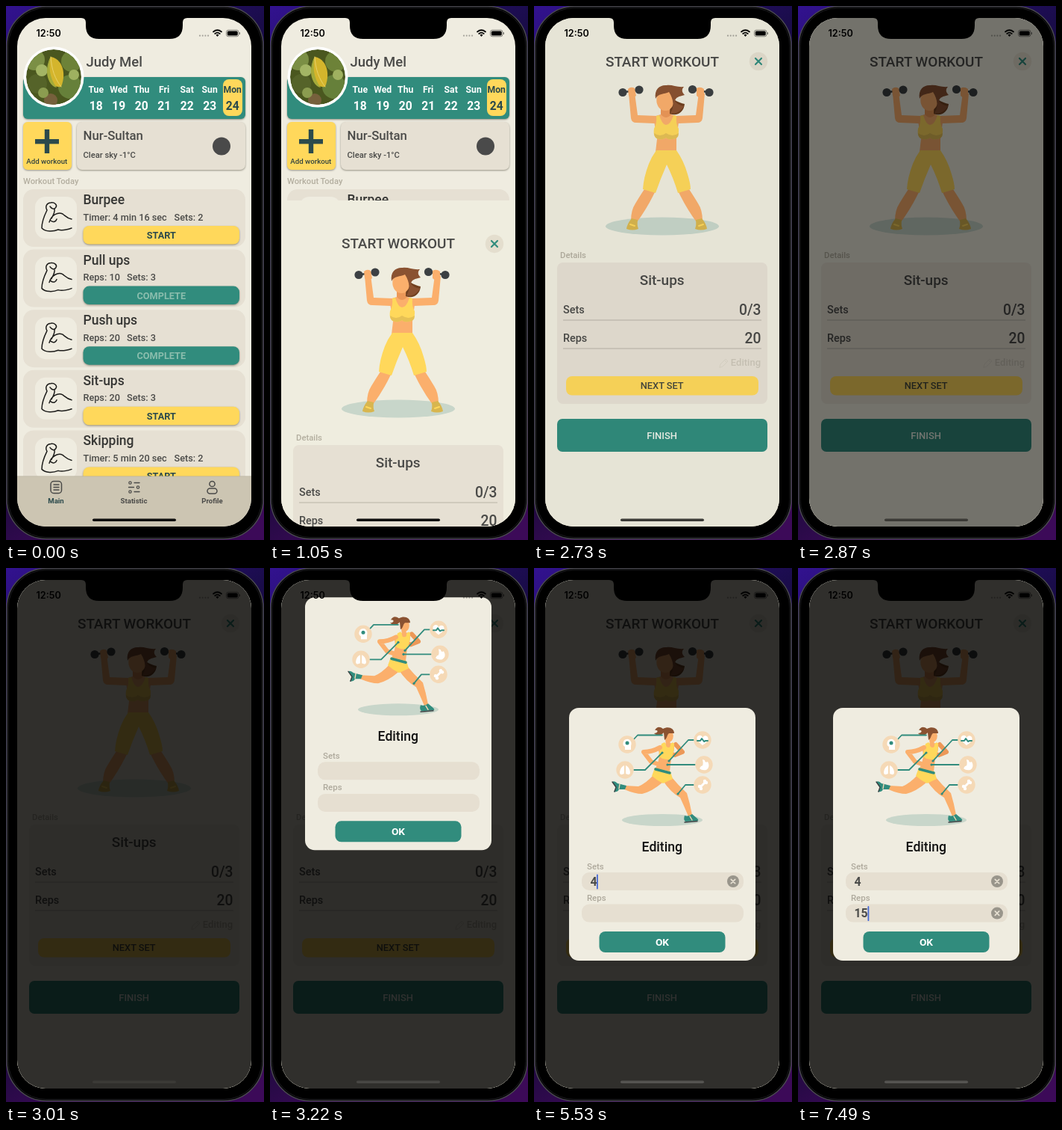
Recreate the animation shown at these times as an HTML page. Size 346 by 714 pixels, loop 8000 ms.

```html
<!DOCTYPE html>
<html lang="en">
<head>
<meta charset="utf-8">
<title>Workout app</title>
<style>
  html, body { margin: 0; width: 100%; height: 100%; overflow: hidden; background: #160a3c; }
  svg { display: block; width: 346px; height: 714px; }
  text { font-family: Roboto, sans-serif; white-space: pre; }
  .sys { font-family: Inter, sans-serif; }
  .lift { filter: drop-shadow(0 1.5px 1px rgba(60, 55, 40, .5)); }
</style>
</head>
<body>
<svg id="stage" viewBox="0 0 346 714"></svg>
<script>
const C = {
  bg: '#efece0', card: '#e6e0d3', green: '#318c7d', yellow: '#ffd85b', ink: '#4a4a48',
  dark: '#363634', mute: '#b3ae9f', navy: '#2b4a4c', skin: '#fbaf6c', skinDark: '#ec9858',
  hair: '#8a5231', iron: '#3c4043', peach: '#f5d9b6', ground: '#c8d6ca'
};

const rect = (x, y, w, h, r, fill, more = '') =>
  `<rect x="${x}" y="${y}" width="${w}" height="${h}" rx="${r}" fill="${fill}" ${more}/>`;
const dot = (x, y, r, fill, more = '') =>
  `<circle cx="${x}" cy="${y}" r="${r}" fill="${fill}" ${more}/>`;
const oval = (x, y, rx, ry, fill) =>
  `<ellipse cx="${x}" cy="${y}" rx="${rx}" ry="${ry}" fill="${fill}"/>`;
const shape = (d, fill) => `<path d="${d}" fill="${fill}"/>`;
const line = (d, color, w, more = '') =>
  `<path d="${d}" fill="none" stroke="${color}" stroke-width="${w}" stroke-linecap="round" stroke-linejoin="round" ${more}/>`;
const text = (x, y, s, size, weight = 500, fill = C.ink, anchor = 'start', more = '') =>
  `<text x="${x}" y="${y}" font-size="${size}" font-weight="${weight}" fill="${fill}" text-anchor="${anchor}" ${more}>${s}</text>`;
const mid = (x, y, s, size, weight, fill) => text(x, y, s, size, weight, fill, 'middle');
const group = (inner, more = '') => `<g ${more}>${inner}</g>`;
const cross = (x, y, a, color, w) =>
  line(`M${x - a} ${y - a}l${2 * a} ${2 * a}m0 ${-2 * a}l${-2 * a} ${2 * a}`, color, w);

function avatar() {
  const blobs = [[38, 72, 14, '#7b8f45'], [88, 74, 14, '#6d8238'], [42, 104, 13, '#556329'],
    [86, 108, 16, '#66803a'], [60, 126, 9, '#76603c'], [48, 86, 8, '#a3b565'], [91, 92, 7, '#9fb160'], [50, 116, 7, '#8b9c50']];
  return dot(64, 95, 40.5, '#fff') +
    group(dot(64, 95, 37, '#4a571f') + blobs.map(b => dot(...b)).join('') +
      shape('M60 68C74 70 82 88 74 108C64 110 56 100 56 88C56 80 57 73 60 68Z', '#d4b52c') +
      shape('M60 68C57 80 58 96 68 109C60 108 55 97 55 88C55 80 57 73 60 68Z', '#a4ab3a') +
      line('M60 68C61 85 66 98 74 108', '#e8d26a', 1), 'clip-path="url(#face)"');
}

function days() {
  return ['Tue', 'Wed', 'Thu', 'Fri', 'Sat', 'Sun', 'Mon'].map((d, i) => {
    const x = 120.7 + i * 30.5, color = i === 6 ? C.navy : '#fff';
    return (i === 6 ? rect(291, 98, 26, 49, 8, C.yellow) : '') +
      mid(x, 116, d, 12.2, 700, color) + mid(x, 139, 18 + i, 15.6, 700, color);
  }).join('');
}

const arm = line('M55 273C51 281 48 290 48 297C53 302 63 302 70 299C76 301 82 299 88 297' +
  'M55 273C52 268 55 263 60 263C65 262 69 266 67 269C65 273 61 271 59 268' +
  'M65 271C66 276 63 280 61 284M58 289C61 279 70 275 76 278C80 281 82 284 88 285M60 287C64 290 67 288 68 285', '#1d1d1b', 1.5);

function workout([name, first, sets, setsX, done], i) {
  const button = rect(103.5, 294, 209.5, 24.5, 8, done ? C.green : C.yellow, 'class="lift"') +
    mid(208.3, 311, done ? 'COMPLETE' : 'START', 12.7, 700, done ? '#8abdad' : C.navy);
  return group(rect(23, 245, 298, 77, 14, C.card) + rect(39, 255, 56, 56, 14, C.bg) + arm +
    text(103.5, 265, name, 17.5, 500, C.dark) + text(103.5, 286.5, first, 12.7) + text(setsX, 286.5, 'Sets: ' + sets, 12.7) +
    group(button, `id="go${i}"`), `transform="translate(0 ${i * 80.6})"`);
}

function tabs() {
  const st = C.ink;
  return rect(15, 629, 314, 68, 0, '#ccc5b2') + rect(15, 628.5, 314, .7, 0, '#b8b19e') +
    `<rect x="60" y="635.5" width="14.5" height="16" rx="4" fill="none" stroke="${st}" stroke-width="1.5"/>` +
    line('M64 640h7M64 643.5h7M64 647h7', st, 1.3) +
    line('M172 637.5h7M164.500 643.5h7M172 649.5h7', st, 1.3) +
    [[166.5, 637.5], [177, 643.5], [166.5, 649.5]].map(p => dot(...p, 1.7, 'none', `stroke="${st}" stroke-width="1.2"`)).join('') +
    dot(276.5, 639, 3.6, 'none', `stroke="${st}" stroke-width="1.5"`) +
    `<rect x="270" y="645" width="13" height="7" rx="3.5" fill="none" stroke="${st}" stroke-width="1.5"/>` +
    mid(67, 665, 'Main', 9.6, 700, C.navy) + mid(171.5, 665, 'Statistic', 9.6, 700, C.ink) +
    mid(276.5, 665, 'Profile', 9.6, 700, C.ink);
}

function home() {
  const list = [['Burpee', 'Timer: 4 min 16 sec', 2, 225.5], ['Pull ups', 'Reps: 10', 3, 162, 1],
    ['Push ups', 'Reps: 20', 3, 162, 1], ['Sit-ups', 'Reps: 20', 3, 162], ['Skipping', 'Timer: 5 min 20 sec', 2, 225.5]];
  return rect(15, 16, 314, 680, 0, C.bg) + text(107.5, 81, 'Judy Mel', 18.5) +
    rect(23, 95, 298, 56, 6, C.green, 'class="lift"') + days() + avatar() +
    rect(23, 155, 65, 64, 6, C.yellow, 'class="lift"') + rect(39, 178, 32, 6.4, 0, C.navy) + rect(51.8, 165, 6.4, 32, 0, C.navy) +
    mid(54.8, 211, 'Add workout', 9.7, 500, '#33443f') +
    rect(95, 155, 226, 64, 7, C.card, 'class="lift"') + text(103.5, 179, 'Nur-Sultan', 16.8) +
    text(103.5, 203, 'Clear sky -1°C', 11.2) + dot(289, 187.5, 12, '#4a4a4a') +
    text(23, 238, 'Workout Today', 11.2, 500, C.mute) + list.map(workout).join('') + tabs();
}

function athlete() {
  const weight = (x1, y1, x2, y2) => line(`M${x1} ${y1}L${x2} ${y2}`, C.iron, 2.5) +
    dot(x1, y1, 5.6, C.iron) + dot(x2, y2, 5.6, C.iron);
  return oval(172, 294.5, 76, 12, C.ground) +
    weight(119, 115.5, 141, 112) + weight(212.5, 111.5, 235, 115.5) +
    shape('M127 117L135 116L139 146L165 147L162 157L137 156Q131 156 130 150Z', C.skin) +
    shape('M229 117L221 116L217 146L190 147L193 157L219 156Q225 156 226 150Z', C.skin) +
    shape('M126 111Q130 107 135 110L137 120Q131 125 127 120ZM218 110Q223 107 228 111L228 120Q223 125 218 120Z', C.skin) +
    shape('M170 132H184V145L195 148L191 178L191 195H163L165 178L160 148L170 145Z', C.skin) +
    shape('M170 136Q178 142 184 138V145Q177 153 170 145Z', C.skinDark) +
    shape('M164 147L168 146Q172 159 177 159Q183 159 187 146L191 147Q190 158 194 164Q195 178 185 178Q180 179 177 176Q173 179 168 178Q159 177 161 164Q165 157 164 147Z', C.yellow) +
    shape('M161 170Q169 176 177 170Q186 176 194 170Q194 178 185 178Q180 179 177 176Q173 179 168 178Q161 177 161 170Z', '#e6c155') +
    shape('M148 245L162 249Q152 270 138 289L130 287Q130 273 136 264Q142 254 148 245Z', C.skin) +
    shape('M208 245L194 249Q204 270 218 289L226 287Q226 273 220 264Q214 254 208 245Z', C.skin) +
    shape('M164 193H191Q201 207 206 225Q210 238 210 245L193 250Q187 230 178 212Q170 230 163 250L146 245Q147 229 154 211Q158 201 164 193Z', C.yellow) +
    shape('M131 284L139 286Q138 293 140 298Q132 301 124 298Q125 291 131 284ZM225 284L217 286Q218 293 216 298Q224 301 232 298Q231 291 225 284Z', '#d8b64f') +
    line('M129 292l6 2M227 292l-6 2', C.yellow, 2) +
    shape('M183 122C189 126 193 129 202 131C201 142 192 148 182 144Z', '#70401f') +
    oval(176, 126, 11.7, 14, C.skin) +
    shape('M163 124C161 111 169 105 178 106C185 105 192 109 201 108C197 112 199 116 202 119C194 121 190 122 189 127C192 132 198 133 201 134C196 142 189 145 183 143C188 136 188 126 181 115C175 118 166 117 163 124Z', C.hair);
}

function sheet() {
  const rule = y => rect(39, y, 266, 1, 0, '#b9b4a7');
  return rect(15, 16, 314, 700, 0, '#efeddf') + mid(172, 80.5, 'START WORKOUT', 19, 500, C.ink) +
    dot(301, 74, 12.2, '#e4dece') + cross(301, 74, 4, C.green, 2.2) + athlete() +
    text(35, 337, 'Details', 11.3, 500, C.mute) + rect(31, 343, 282, 189, 8, C.card) +
    mid(171.7, 373, 'Sit-ups', 19, 500, C.ink) +
    text(39, 411, 'Sets', 14.4) + text(304.5, 413, '0/3', 19.3, 500, C.ink, 'end') + rule(419.5) +
    text(39, 449, 'Reps', 14.4) + text(304.5, 451, '20', 19.3, 500, C.ink, 'end') + rule(457.5) +
    group(text(304, 481, 'Editing', 13, 500, C.mute, 'end') +
      line('M249 483l1-4l7-7l3 3l-7 7zM255.500 473.500l3 3', '#d2ccbd', 1), 'id="edit"') +
    rect(43, 495, 258, 25.5, 8, C.yellow) + mid(171.7, 512, 'NEXT SET', 12.8, 500, '#45483d') +
    rect(31, 552, 282, 44, 7, C.green) + mid(171.7, 579, 'FINISH', 13, 500, '#eef3ea');
}

function runner() {
  const badges = [[125, 236], [122, 270], [226, 230], [228, 263], [226, 290]];
  return oval(172, 337, 54, 8, C.ground) +
    // far arm and far leg
    line('M190 236L199 246L189 250', C.skinDark, 6) + line('M189 250L183 247', C.skinDark, 4.5) +
    shape('M160 277L172 287Q158 299 145 302Q135 302 121 296L122 291L140 292Q150 288 160 277Z', C.skin) +
    shape('M105 286Q108 284 112 288L124 291L122 296L114 296Q112 300 107 299L110 294Z', C.green) +
    line('M105 286l5 7l-2 6', C.iron, 1.4) + line('M115 289l-1 6', C.peach, 1.4) +
    // near leg
    shape('M172 283L184 279Q193 290 205 301Q209 314 212 330L207 332Q202 320 196 307Q183 300 172 283Z', C.skin) +
    shape('M202 331Q207 333 212 329L219 335Q222 338 218 338L203 339Q200 336 202 331Z', C.green) +
    line('M202 340L219 338.500', C.iron, 1.4) + line('M209 332l3 5', C.peach, 1.4) +
    // torso
    shape('M172 235L188 234Q189 246 184 255L182 272L163 268Q170 254 167 244Z', C.skin) +
    shape('M171 235L175 233Q180 240 186 233L188 235Q188 249 183 256Q174 257 167 252Q169 242 171 235Z', C.yellow) +
    shape('M162 267L183 272L186 282L173 288Q165 284 158 278Z', C.yellow) + line('M163 269L182 274', C.green, 3.5) +
    line('M169 240Q158 246 147 246L157 259L166 262', C.skin, 6) +
    // head
    line('M179 228L180 237', C.skin, 6) + oval(181, 224.5, 5.8, 8, C.skin) +
    shape('M188 221C188 214 180 211 173 215C168 211 164 213 162 217C167 216 167 221 161 221C166 226 172 223 174 220L175 230C179 228 178 223 181 221Z', C.hair) +
    // call-outs
    line('M131 232L139 223.500H172M134 270H149L172 247M214 230H207L181 258M216 263H179M214 290H203L193 302', C.green, 1.8) +
    [[172, 247], [181, 258], [179, 263], [193, 302]].map(p => dot(...p, 1.6, C.green)).join('') +
    badges.map(b => dot(...b, 11.7, C.peach)).join('') +
    shape('M120 232Q122 228 127 229Q132 232 130 238V243H122V239Q118 237 120 232Z', '#fff') + dot(125, 234, 2.5, C.green) +
    shape('M121 264V275Q115 278 115 273Q116 266 121 264ZM123 264V275Q129 278 129 273Q128 266 123 264Z', '#fff') +
    shape('M226 237Q214 228 221 224Q225 223 226 227Q228 223 232 225Q237 230 226 237Z', '#fff') + line('M219 231h4l2-3l3 4l2-1h3', C.green, 2) +
    shape('M226 256L229 257Q229 261 233 259Q237 266 231 270Q225 271 222 268L224 265Q228 265 226 256Z', '#fff') +
    line('M223 293L230 286', '#fff', 3) + [[222, 292], [224, 295], [229, 285], [231, 287]].map(p => dot(...p, 2.2, '#fff')).join('');
}

function dialog() {
  const field = (id, label, y) => text(71, y - 4.5, label, 11.4, 500, '#aea99c') + rect(64, y, 217, 24, 10, '#e6dfd1') +
    text(75.5, y + 17.8, '', 15.8, 700, C.ink, 'start', `id="${id}"`) +
    group(dot(267, y + 12, 8, '#99958b') + cross(267, y + 12, 2.7, '#e6dfd1', 1.7), `id="${id}X"`);
  return rect(47, 187, 250, 338, 13, C.bg) + runner() + mid(171.8, 379, 'Editing', 17.6, 500, '#111') +
    field('sets', 'Sets', 407) + field('reps', 'Reps', 449.6) +
    rect(76, 409.5, 1.8, 20, .9, '#4468d6', 'id="caret"') +
    rect(87.5, 486, 169, 28, 8, C.green) + mid(172, 505, 'OK', 13.7, 700, '#fff');
}

function status() {
  return text(40.5, 41, '12:50', 12.6, 600, '#000', 'start', 'class="sys"') +
    [0, 1, 2, 3].map(i => dot(260 + i * 3.7, 39.7, 1.1, '#000', 'opacity=".3"')).join('') +
    line('M278 34.500Q283.500 30 289 34.500M280.200 37Q283.500 34.200 286.800 37', '#000', 1.7) +
    shape('M281.500 38.700Q283.500 37 285.500 38.700L283.500 41Z', '#000') +
    `<rect x="295.5" y="32.2" width="16.5" height="8.6" rx="2.7" fill="none" stroke="#000" stroke-opacity=".45"/>` +
    rect(296.8, 33.5, 13.9, 6, 1.5, '#000') + rect(312.8, 35, 1.2, 3, .6, '#000', 'opacity=".5"');
}

const stage = document.getElementById('stage');
stage.innerHTML = `<defs>
  <linearGradient id="desk" x2=".3" y2="1"><stop offset="0" stop-color="#32128f"/><stop offset=".3" stop-color="#1a0c4a"/>
    <stop offset=".8" stop-color="#170a38"/><stop offset="1" stop-color="#3c0a58"/></linearGradient>
  <clipPath id="screen">${rect(15, 16, 314, 680, 38, '#000')}</clipPath>
  <clipPath id="face">${dot(64, 95, 37, '#000')}</clipPath></defs>` +
  rect(0, 0, 346, 714, 0, 'url(#desk)') +
  rect(1, .5, 344, 712, 53, '#000', 'stroke="#4a4950" stroke-width="1.5"') +
  rect(3, 2.5, 340, 708, 51, '#000', 'stroke="#1c1c1f" stroke-width="1"') +
  group(group(home()) + group(sheet(), 'id="sheet"') + rect(15, 16, 314, 680, 0, '#000', 'id="dim"') +
    group(dialog(), 'id="dialog"') + status() + rect(116, 685.5, 112, 3.6, 1.8, '#000', 'id="bar"'), 'clip-path="url(#screen)"') +
  shape('M101 15V16Q107 16 107 22V26Q107 44 125 44H219Q237 44 237 26V22Q237 16 243 16V15Z', '#000');

const el = id => document.getElementById(id);
const LOOP = 8000, STEP = 70;

// time, sets, reps, caret row, caret x, caret opacity
const typing = [
  [0, '', '', 0, 76, 0], [4410, '', '', 0, 76, 1], [5040, '', '', 0, 76, .5], [5110, '', '', 0, 76, 0],
  [5390, '', '', 0, 76, .4], [5460, '', '', 0, 76, 1], [5530, '4', '', 0, 84, 1], [6090, '4', '', 0, 84, .5],
  [6160, '4', '', 0, 84, 0], [6230, '4', '', 1, 76, 1], [6790, '4', '', 1, 76, .7], [6860, '4', '', 1, 76, .3],
  [6930, '4', '', 1, 76, 0], [7210, '4', '', 1, 76, .4], [7280, '4', '', 1, 76, 1], [7350, '4', '1', 1, 84.5, 1],
  [7490, '4', '15', 1, 93.5, 1]
];
const barColors = [[0, '#0b0b0b'], [1330, '#6a6963'], [2730, '#3b3a36'], [3080, '#484744'], [4410, '#555451']];

const at = (table, t) => table.findLast(row => t >= row[0]);
const part = (t, a, b) => Math.min(1, Math.max(0, (t - a) / (b - a)));
const smooth = u => u * u * (3 - 2 * u);
const spring = s => s <= 0 ? 1 : (1 + 18.26 * s) * Math.exp(-18.26 * s);
const show = (node, on) => node.setAttribute('visibility', on ? 'visible' : 'hidden');
const move = (node, x, y) => node.setAttribute('transform', `translate(${x} ${y})`);

function draw(t) {
  const slide = 684 * spring((t - 930) / 1000);
  move(el('sheet'), 0, slide < 1 ? 0 : slide);
  show(el('sheet'), t >= 980);
  el('go3').setAttribute('opacity', t >= 840 && t < 1470 ? .6 : 1);
  el('edit').setAttribute('opacity', t >= 2590 && t < 3010 ? .5 : 1);
  el('dim').setAttribute('opacity', t < 2730 ? 0 : .8 * smooth(part(t, 2690, 2990)));
  show(el('dialog'), t >= 2870);
  move(el('dialog'), 0, -714 * (1 - smooth(part(t, 2930, 3340))));
  el('bar').setAttribute('fill', at(barColors, t)[1]);

  const [, sets, reps, row, x, alpha] = at(typing, t);
  for (const [id, value] of [['sets', sets], ['reps', reps]]) {
    el(id).textContent = value;
    el(id + 'X').setAttribute('opacity', value ? 1 : 0);
  }
  move(el('caret'), x - 76, row * 42.6);
  el('caret').setAttribute('opacity', alpha);
}

const start = performance.now();
function tick() {
  const t = (performance.now() - start) % LOOP;
  draw(Math.floor(t / STEP) * STEP);
  requestAnimationFrame(tick);
}
tick();
</script>
</body>
</html>
```
